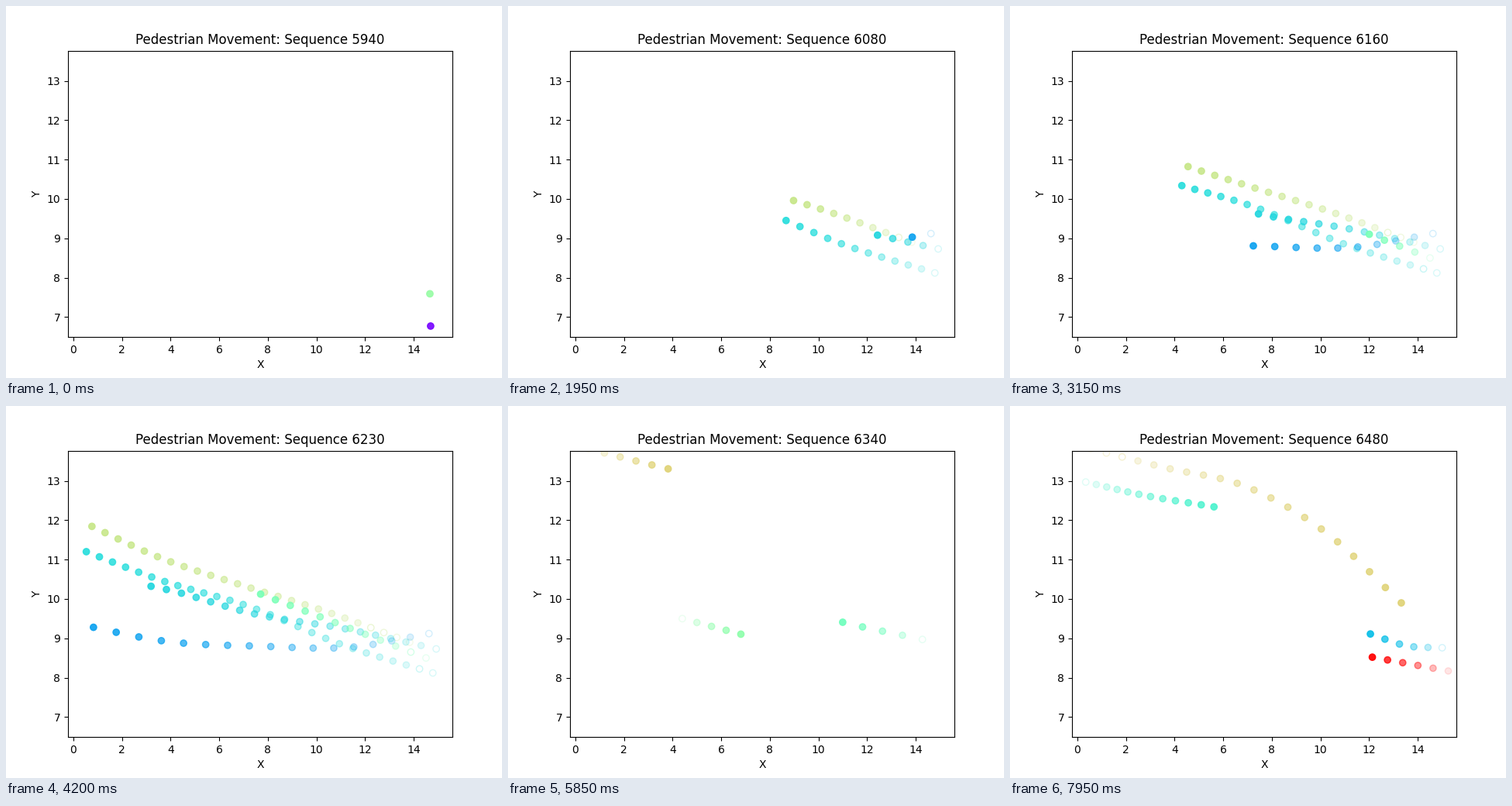
These frames come from a looping animation (640 px wide and 480 px high, 8 s). A matplotlib script:

```python
import matplotlib.pyplot as plt
import numpy as np
from matplotlib.animation import FuncAnimation

plt.rcParams["font.family"] = "DejaVu Sans"

TICK_MS, TICKS_PER_STEP, LOOP_MS = 50, 3, 8000
NEW_ALPHA, OLD_ALPHA = 0.93, 0.1


def rainbow(t):
    return np.clip([abs(2 * t - 0.5), np.sin(np.pi * t), np.cos(np.pi * t / 2)], 0, 1)


def glide(knots, count):
    """Smooth curve of count points through knots evenly spaced in time."""
    knots = np.array(knots, float)
    slopes = np.gradient(knots, axis=0)
    place = np.linspace(0, len(knots) - 1, count)
    i = np.minimum(place.astype(int), len(knots) - 2)
    u = (place - i)[:, None]
    ease = u * u * (3 - 2 * u)
    return (knots[i] * (1 - ease) + knots[i + 1] * ease
            + slopes[i] * u * (1 - u) ** 2 - slopes[i + 1] * u * u * (1 - u))


class Walker:
    """A pedestrian in view from the first to the last step."""

    def __init__(self, hue, first, last, *knots):
        self.first, self.last = first, last
        self.path = glide(knots, last - first + 1)
        self.color = rainbow(hue)

    def trail(self, step):
        """Positions up to now, with face and edge colours fading into the past."""
        points = self.path[:step - self.first + 1]
        alpha = np.linspace(NEW_ALPHA, OLD_ALPHA, len(points))[::-1]
        faces = np.column_stack([np.tile(self.color, (len(points), 1)), alpha])
        edges = faces.copy()
        # The palest fills vanish and leave only a ring.
        pale = alpha * (1 - self.color).sum() < 0.162
        faces[pale, 3] = 0
        edges[pale, 3] *= 1.8
        return points, faces, edges


walkers = [
    Walker(0.01, 0, 1, (14.69, 6.77), (15.29, 6.55)),
    Walker(0.55, 0, 1, (14.66, 7.59), (15.25, 7.4)),
    Walker(0.64, 4, 29, (13.83, 8.9), (10.49, 9.66), (7.03, 10.33),
           (3.6, 11.04), (0.23, 12)),
    Walker(0.335, 2, 29, (14.78, 8.12), (11.08, 8.83), (7.26, 9.8),
           (3.63, 10.47), (0, 11.33)),
    Walker(0.32, 9, 33, (14.92, 8.73), (11.18, 9.24), (7.45, 9.62),
           (3.83, 10.24), (-0.05, 10.66)),
    Walker(0.22, 12, 29, (14.62, 9.12), (11.33, 8.77), (7.68, 8.8),
           (3.85, 8.92), (-0.1, 9.4)),
    Walker(0.49, 17, 34, (14.5, 8.5), (10.97, 9.35), (7.5, 10.17), (4.1, 10.97)),
    Walker(0.69, 34, 53, (0.55, 13.81), (3.65, 13.33), (6.92, 12.86),
           (10.2, 11.7), (13.32, 9.9)),
    Walker(0.53, 35, 52, (4.4, 9.5), (6.96, 9.08), (9.58, 8.66),
           (12.25, 7.72), (15, 6.87)),
    Walker(0.47, 35, 52, (14.27, 8.97), (10.79, 9.44), (7.36, 10.08),
           (3.77, 10.42), (0.24, 10.7)),
    Walker(0.4, 42, 53, (0.35, 12.97), (2.77, 12.63), (5.62, 12.34)),
    Walker(0.27, 48, 53, (15, 8.76), (13.54, 8.81), (12.05, 9.11)),
    Walker(1, 48, 53, (15.25, 8.17), (12.13, 8.52)),
]

fig, ax = plt.subplots(figsize=(6.4, 4.8), dpi=100)
ax.set(xlim=(-0.215, 15.585), ylim=(6.49, 13.768), xlabel="X", ylabel="Y")
title = ax.set_title("")
dots = ax.scatter([], [])


def update(tick):
    step = tick // TICKS_PER_STEP
    trails = [w.trail(step) for w in walkers if w.first <= step <= w.last]
    points, faces, edges = (np.vstack(part) for part in zip(*trails))
    dots.set_offsets(points)
    dots.set_facecolor(faces)
    dots.set_edgecolor(edges)
    # One recording with nobody in view is skipped.
    sequence = 5940 + 10 * (step + (step >= 2))
    title.set_text(f"Pedestrian Movement: Sequence {sequence}")
    return dots, title


anim = FuncAnimation(fig, update, frames=LOOP_MS // TICK_MS, interval=TICK_MS,
                     repeat=True, repeat_delay=0)
plt.show()
```
